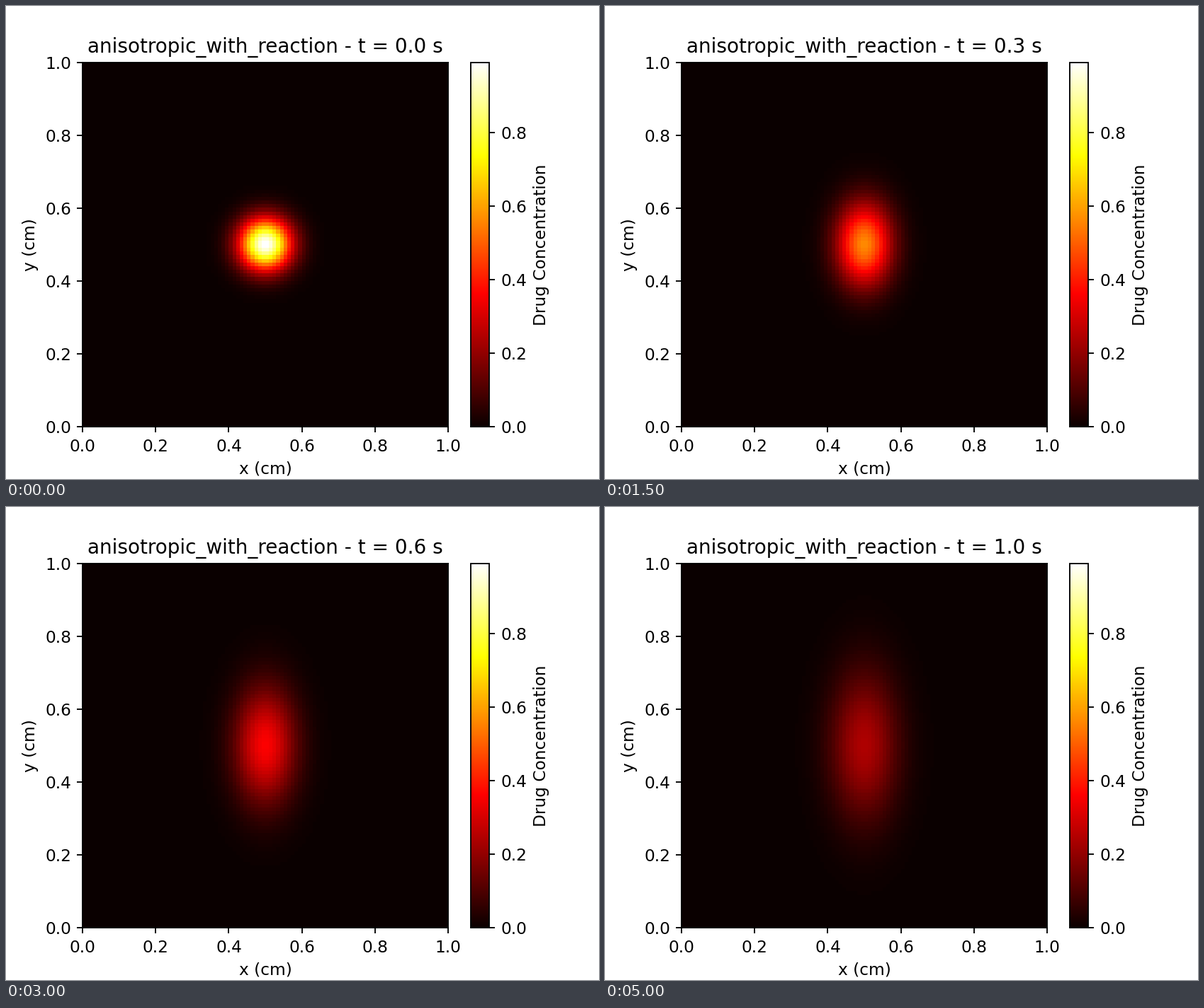
A matplotlib script that plays this animation: 837x669 px, repeating every 5.5 s.

```python
import numpy as np
import matplotlib.pyplot as plt
from matplotlib.animation import FuncAnimation

W, H, DPI = 837, 669, 167.4
FRAMES, STEP_MS, DT = 11, 500, 0.1
N = 100                      # grid points per side
DX, DY, RATE = 0.001, 0.01, 0.1
VAR0 = 0.0025                # initial variance of the drug spot

x = np.linspace(0, 1, N)
X, Y = np.meshgrid(x, x)


def concentration(t):
    """Anisotropic diffusion of a Gaussian spot with first-order decay."""
    vx = VAR0 + 2 * DX * t
    vy = VAR0 + 2 * DY * t
    peak = VAR0 / np.sqrt(vx * vy) * np.exp(-RATE * t)
    return peak * np.exp(-(X - 0.5) ** 2 / (2 * vx) - (Y - 0.5) ** 2 / (2 * vy))


def title_text(i):
    return f"anisotropic_with_reaction - t = {i * DT:.1f} s"


fig, ax = plt.subplots(figsize=((W + 0.01) / DPI, (H + 0.01) / DPI), dpi=DPI)
start = concentration(0)
image = ax.imshow(start, cmap="hot", origin="lower", extent=[0, 1, 0, 1],
                  vmin=0, vmax=start.max())
fig.colorbar(image, ax=ax, label="Drug Concentration")
ax.set_xlabel("x (cm)")
ax.set_ylabel("y (cm)")
title = ax.set_title(title_text(0))


def update(i):
    # The field lags the clock by one step, so it holds still at first.
    image.set_data(concentration(max(i - 1, 0) * DT))
    title.set_text(title_text(i))
    return image, title


anim = FuncAnimation(fig, update, frames=FRAMES, interval=STEP_MS,
                     repeat=True, repeat_delay=0, blit=False)
plt.show()
```
